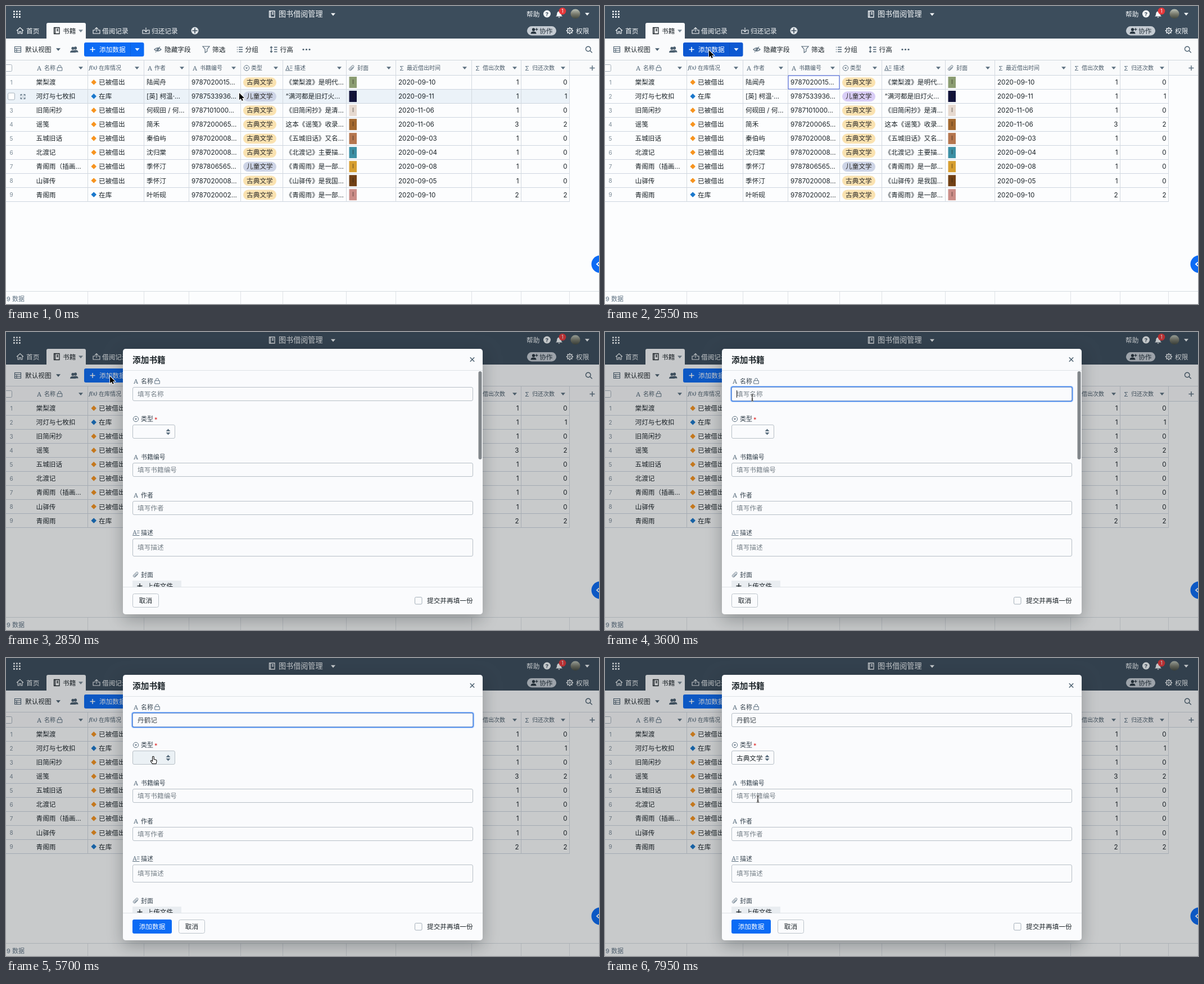
An HTML page with a canvas that plays this animation: 1055 px wide and 531 px high, repeating every 8 s.

```html
<!DOCTYPE html>
<html lang="zh-CN">
<head>
<meta charset="utf-8">
<title>图书借阅管理</title>
<style>
html, body { margin: 0; width: 100%; height: 100%; overflow: hidden; background: #fcfdfe; }
canvas { display: block; width: 1055px; height: 531px; }
</style>
</head>
<body>
<canvas id="stage"></canvas>
<script>
const W = 1055, H = 531, LOOP = 8000, STEP = 150;
const canvas = document.getElementById('stage');
const dpr = window.devicePixelRatio || 1;
canvas.width = W * dpr;
canvas.height = H * dpr;
const c = canvas.getContext('2d');

const SANS = 'Inter, "Noto Sans CJK SC", "Noto Sans CJK JP", sans-serif';
const SERIF = '"Noto Serif", "Liberation Serif", serif';
const INK = '#1c2429', GREY = '#5c7080', PALE = '#f5f8fa', BLUE = '#0b6bf5';
const BODY = 11.67, SMALL = 10;
const ROW0 = 123, ROWH = 25.03;
const lineY = i => Math.round(ROW0 + ROWH * i);
const midY = i => 136 + ROWH * i;

const COLS = [145, 245, 325, 417, 492, 605, 693, 828, 916, 1002];
const HEADS = [
  ['A', 59, '名称', 68, 133], ['f', 155, '在库情况', 165, 233], ['A', 256, '作者', 264, 313],
  ['A', 336, '书籍编号', 345, 405], ['o', 428, '类型', 436, 480], ['L', 503, '描述', 513, 593],
  ['clip', 615, '封面', 625, 681], ['S', 704, '最近借出时间', 713, 816],
  ['S', 839, '借出次数', 848, 905], ['S', 927, '归还次数', 936, 991]
];
// title, available, author, number, children's, description, cover, date, lent, returned
const BOOKS = [
  ['棠梨渡', 0, '陆闻舟', '9787020015…', 0, '《棠梨渡》是明代…', '#8b9d72', '2020-09-10', 1, 0],
  ['河灯与七枚扣', 1, '[英] 柯温·…', '9787533936…', 1, '“满河都是旧灯火…', '#11133a', '2020-09-11', 1, 1],
  ['旧简闲抄', 0, '何砚田 / 何…', '9787101000…', 0, '《旧简闲抄》是清…', '#e6d9cf', '2020-11-06', 1, 0],
  ['谣笺', 0, '简禾', '9787200065…', 0, '这本《谣笺》收录…', '#a2682f', '2020-11-06', 3, 2],
  ['五城旧话', 0, '秦伯屿', '9787020008…', 0, '《五城旧话》又名…', '#b5764f', '2020-09-03', 1, 0],
  ['北渡记', 0, '沈归棠', '9787020008…', 0, '《北渡记》主要描…', '#3b8fa4', '2020-09-04', 1, 0],
  ['青阁雨（插画…', 0, '季怀汀', '9787806565…', 1, '《青阁雨》是一部…', '#d79f30', '2020-09-08', 1, 0],
  ['山驿传', 0, '季怀汀', '9787020008…', 0, '《山驿传》是我国…', '#714014', '2020-09-05', 1, 0],
  ['青阁雨', 1, '叶听砚', '9787020002…', 0, '《青阁雨》是一部…', '#cb8d88', '2020-09-10', 2, 2]
];
const TYPED = [
  ['d', '的 到 都 大 对'], ['da', '大 打 达 答 搭'], ['dan', '但 单 蛋 担 淡'],
  ["dan'h", '丹鹤 单行 弹回 但还 但很'], ["dan'he", '丹鹤 单核 弹盒 但和 蛋盒'],
  ["dan'he'j", '丹鹤记 单核机 弹核集 丹鹤 单核']
];
// pointer moves: start, end, x, y
const MOVES = [
  [0, 150, 415, 156], [450, 1500, 404, 243], [1500, 1950, 366, 132], [1950, 2250, 185, 79],
  [2850, 3450, 262, 117], [5100, 5700, 262, 176], [6150, 6900, 264, 196], [7200, 7950, 272, 251]
];

const ICON = {
  caret: 'M-4-2.2H4L0 2.4Z',
  book: 'M-4.5-5.5H5V5.5H-4.5ZM-2.5-5.5V5.5M0-2.5H3M0 0H3',
  home: 'M-6 0L0-5.5L6 0M-4-1V5H-1.3V1.5H1.3V5H4V-1',
  out: 'M-2-1H-6V5H6V-1H2M0 2V-5.5M-3-2.7L0-5.5L3-2.7',
  back: 'M-2-1H-6V5H6V-1H2M0-5.5V2M-3-.8L0 2L3-.8',
  plus: 'M-4.5 0H4.5M0-4.5V4.5',
  cross: 'M-3.7-3.7L3.7 3.7M3.7-3.7L-3.7 3.7',
  clip: 'M3.8-1L-.8 3.6C-3 5.6-6 2.8-4 .6L.8-4.2C2.6-5.8 5-3.4 3.4-1.7L-1 2.6C-2 3.4-3 2.3-2.2 1.4L1.7-2.4',
  lock: 'M-4.3-.8H4.3V4.6H-4.3ZM-2.4-.8V-2.6A2.4 2.4 0 0 1 2.4-2.6V-.8',
  table: 'M-5.5-5H5.5V5H-5.5ZM-5.5-1.7H5.5M-5.5 1.7H5.5M-2-1.7V5',
  eye: 'M-6 0Q0-6 6 0Q0 6-6 0ZM-1.7 0A1.7 1.7 0 1 0 1.7 0A1.7 1.7 0 1 0-1.7 0M-4 5L4-5',
  funnel: 'M-6-5.5H6L1.8-.5V3.5L-1.8 5.5V-.5Z',
  list: 'M-2-4H5M-2 0H5M-2 4H5M-5-4H-4M-5 0H-4M-5 4H-4',
  height: 'M-4-5V5M-6-3L-4-5L-2-3M-6 3L-4 5L-2 3M1-4H6.5M1 0H6.5M1 4H6.5',
  search: 'M-5.5-1A4.3 4.3 0 1 0 3.1-1A4.3 4.3 0 1 0-5.5-1M2.2 2.2L5.8 5.8',
  bell: 'M-6 3.5Q-3.7 2-3.7-1.5Q-3.5-5 0-5.5Q3.5-5 3.7-1.5Q3.7 2 6 3.5ZM-1.8 4.5H1.8L0 6.2Z',
  person: 'M-2.6-2.5A2.6 2.8 0 1 1 2.6-2.5A2.6 2.8 0 1 1-2.6-2.5M-5 5Q-5 1.5-1.5 1H1.5Q5 1.5 5 5Z',
  expand: 'M-4-1V-4H-1M1-4H4V-1M4 1V4H1M-1 4H-4V1M-4-4L-1-1M4-4L1-1M4 4L1 1M-4 4L-1 1',
  lines: 'M2-3.5H6.5M2 0H6.5M-6 4.5H6.5',
  updown: 'M-4-1L0-5.5L4-1ZM-4 1L0 5.5L4 1Z',
  chev: 'M-1.5-1L0 .8L1.5-1',
  arrow: 'M0 0V12.3L2.9 9.7L4.8 14L6.8 13.1L4.9 8.9H9Z',
  hand: 'M-1.4 0Q0-1.5 1.2 0V4.5L5 5.5Q6.2 6 6 8L5 12.5H-1.5L-4.6 8Q-5 6.4-3.4 6.6L-1.4 8Z',
  beam: 'M-2.3-5.5Q0-5.5 0-4Q0-5.5 2.3-5.5M0-4V4.5M-2.3 6Q0 6 0 4.5Q0 6 2.3 6M-1.3 2.5H1.3'
};
for (const k in ICON) ICON[k] = new Path2D(ICON[k]);

function icon(name, x, y, color, fill, lw = 1.1) {
  c.save();
  c.translate(x, y);
  c.lineWidth = lw;
  c.fillStyle = c.strokeStyle = color;
  fill ? c.fill(ICON[name]) : c.stroke(ICON[name]);
  c.restore();
}

function text(s, x, y, size = BODY, color = INK, align = 'left', weight = 400, family = SANS) {
  c.font = `${weight} ${size}px ${family}`;
  c.textAlign = align;
  c.fillStyle = color;
  c.fillText(s, x, y + size * .37);
}

function rect(x, y, w, h, color) {
  c.fillStyle = color;
  c.fillRect(x, y, w, h);
}

function box(x, y, w, h, r, fill, stroke, lw = 1) {
  c.beginPath();
  c.roundRect(x, y, w, h, r);
  if (fill) { c.fillStyle = fill; c.fill(); }
  if (stroke) { c.strokeStyle = stroke; c.lineWidth = lw; c.stroke(); }
}

function dot(x, y, r, color) {
  c.beginPath();
  c.arc(x, y, r, 0, 7);
  c.fillStyle = color;
  c.fill();
}

function ring(x, y, r, color, lw = 1) {
  c.beginPath();
  c.arc(x, y, r, 0, 7);
  c.strokeStyle = color;
  c.lineWidth = lw;
  c.stroke();
}

function fieldIcon(kind, x, y) {
  if (kind === 'A') text('A', x, y, 11.5, GREY, 'center', 500, SERIF);
  else if (kind === 'f') text('f(x)', x, y, 8, GREY, 'center', 'italic 600', SERIF);
  else if (kind === 'S') text('Σ', x, y, 11, GREY, 'center');
  else if (kind === 'clip') icon('clip', x, y, GREY, false, 1);
  else if (kind === 'o') { ring(x, y, 4.7, GREY); icon('chev', x, y, GREY, false, 1.3); }
  else {
    text('A', x - 2, y - .5, 10.5, GREY, 'center', 500, SERIF);
    icon('lines', x, y, GREY, false, 1);
  }
}

function drawHeader() {
  rect(0, 0, W, 58, '#3c4d5c');
  for (let i = 0; i < 9; i++) box(13 + i % 3 * 5, 8.5 + (i / 3 | 0) * 4.8, 2.8, 2.8, .6, PALE);
  icon('book', 473, 14.5, PALE, false, 1.3);
  text('图书借阅管理', 485, 14.5, 13.1, PALE, 'left', 500);
  icon('caret', 582, 15, PALE, true);
  text('帮助', 926, 14.5, BODY, PALE);
  dot(962.5, 14, 6.5, PALE);
  text('?', 962.5, 14.3, 9.5, '#3c4d5c', 'center', 700);
  icon('bell', 984, 15, PALE, true);
  dot(990, 9, 6.3, '#e5383b');
  text('1', 990, 9.3, 8.5, '#fff', 'center');
  const g = c.createLinearGradient(0, 6, 0, 23);
  g.addColorStop(0, '#b9bfb4');
  g.addColorStop(.5, '#77796c');
  g.addColorStop(1, '#40463c');
  dot(1013, 14, 8.5, g);
  icon('caret', 1034, 14.5, PALE, true);

  icon('home', 25, 44, PALE);
  text('首页', 36, 44.5, BODY, PALE);
  box(72, 30, 70, 29, [3, 3, 0, 0], '#fafbfc');
  icon('book', 90, 44, INK, false, 1.3);
  text('书籍', 101, 44.5, BODY, INK);
  icon('caret', 133, 44.5, '#7b8a96', true);
  icon('out', 161, 44, PALE);
  text('借阅记录', 171, 44.5, BODY, PALE);
  icon('back', 249, 44, PALE);
  text('归还记录', 259, 44.5, BODY, PALE);
  dot(336, 44, 6.5, '#dfe4e8');
  icon('plus', 336, 44, '#3c4d5c', false, 1.6);
  box(927, 36, 52, 16.5, 8.2, '#c5ccd3');
  icon('person', 938.5, 44.5, '#26333e', true);
  rect(941.5, 41, 5, 1.2, '#26333e');
  rect(943.4, 39.1, 1.2, 5, '#26333e');
  text('协作', 949, 44.5, BODY, '#26333e');
  ring(1003, 44, 4.2, PALE, 1.4);
  ring(1003, 44, 1.5, PALE);
  for (let i = 0; i < 8; i++) {
    const a = i * Math.PI / 4;
    dot(1003 + 5.3 * Math.cos(a), 44 + 5.3 * Math.sin(a), 1, PALE);
  }
  text('权限', 1014, 44.5, BODY, PALE);
}

function drawToolbar(t) {
  rect(0, 58, W, 39, '#fafbfc');
  const y = 77.5, ic = '#4c6070';
  const hover = t >= 2250 && t < 2700;
  icon('table', 21, y, ic);
  text('默认视图', 34, y);
  icon('caret', 93, y, ic, true);
  icon('person', 123.5, y, ic, true);
  icon('person', 119, y + .5, ic, true);
  box(139, 65, 106.5, 25, 3, hover ? '#0c58d2' : BLUE);
  rect(221, 66, 1, 23, 'rgba(0,0,0,.1)');
  icon('plus', 154, y, '#fff', false, 1.5);
  text('添加数据', 166, y, BODY, '#fff', 'left', 500);
  icon('caret', 233.5, y, '#fff', true);
  icon('eye', 270, y, ic);
  text('隐藏字段', 282, y);
  icon('funnel', 356, y, ic);
  text('筛选', 367, y);
  icon('list', 416, y, ic, false, 1.3);
  text('分组', 425.5, y);
  icon('height', 476, y, ic, false, 1.3);
  text('行高', 487.5, y);
  [529, 534.5, 540].forEach(x => dot(x, y, 1.6, ic));
  icon('search', 1037, y, ic, false, 1.4);
}

function drawRow(b, i, hover) {
  const y = midY(i), top = lineY(i);
  if (hover) rect(0, top + 1, 1003, lineY(i + 1) - top, '#ebf2f8');
  rect(0, lineY(i + 1), 1003, 1, '#cdd5df');
  if (hover) {
    box(3.5, y - 6, 12, 12, 2, '#fff', '#a5b0ba');
    icon('expand', 30, y + .5, GREY, false, 1);
  } else text(i + 1, 9.5, y, SMALL, '#7b8a96', 'center');
  text(b[0], 53.5, y);
  const half = 4.7;
  c.save();
  c.translate(156.2, y - .2);
  c.rotate(Math.PI / 4);
  box(-half * .72, -half * .72, half * 1.44, half * 1.44, .6, b[1] ? '#1b78cc' : '#f79420');
  c.restore();
  text(b[1] ? '在库' : '已被借出', 165, y);
  text(b[2], 250, y);
  text(b[3], 330, y);
  const kids = i === 1 && !hover ? '#d9cdf6' : '#cdd4e6';
  box(422, y - 8.7, 59, 17.8, 8.9, b[4] ? kids : '#fae2b0');
  text(b[4] ? '儿童文学' : '古典文学', 451.4, y, BODY, '#2b2a28', 'center');
  text(b[5], 497.5, y);
  rect(610.5, y - 10, 13.5, 20, b[6]);
  rect(616.5, y - 5, 2, 8, 'rgba(30,25,20,.35)');
  text(b[7], 698, y);
  text(b[8], 912.5, y, BODY, INK, 'right');
  text(b[9], 998.5, y, BODY, INK, 'right');
}

function drawTable(t, p) {
  rect(0, 97, W, H - 97, '#fcfdfe');
  rect(0, 97, W, 26, '#f9fafb');
  rect(0, 96, W, 1, '#cfd6dc');
  rect(0, ROW0, W, 1, '#cdd5df');
  box(-1.5, 104.5, 12, 12, 2, '#fff', '#a5b0ba');
  for (const [kind, ix, label, tx, cx] of HEADS) {
    fieldIcon(kind, ix, 110.5);
    text(label, tx, 110.5, SMALL, '#4c5d6b');
    icon('caret', cx, 110.5, GREY, true, 1);
  }
  icon('lock', 95.5, 110.5, GREY, false, 1);
  icon('plus', 1043, 110.5, GREY, false, 1.5);
  const over = t < 2550 && p.y > ROW0 ? Math.floor((p.y - ROW0) / ROWH) : -1;
  BOOKS.forEach((b, i) => drawRow(b, i, i === over));
  for (const x of COLS) {
    rect(x, 97, 1, 252, '#d3d9e0');
    rect(x, 508, 1, 23, '#dfe3e7');
  }
  if (t >= 1950 && t < 2700) box(326, 124, 91, 24, 0, null, '#3d56d8');
  rect(0, 508, W, 1, '#d6dce1');
  text('9 数据', 1, 522, 11, GREY);
  dot(1057, 460, 15.5, BLUE);
  c.beginPath();
  c.moveTo(1055, 456.5);
  c.lineTo(1051, 460);
  c.lineTo(1055, 463.5);
  c.strokeStyle = '#fff';
  c.lineWidth = 1.8;
  c.stroke();
}

function label(kind, s, y) {
  fieldIcon(kind, 231, y);
  text(s, 240, y, 10.9, '#33414c');
}

function field(y, h, hint) {
  box(225.5, y + .5, 605, h - 1, 2.5, null, '#b7bfc6');
  if (hint) text(hint, 234, y + h / 2, BODY, '#757f87');
}

function drawName(t) {
  const focus = t >= 3600 && t < 5850, n = (t - 3900) / STEP;
  field(98, 25, t < 3900 ? '填写名称' : '');
  if (focus) {
    box(223.8, 96.8, 608.4, 27.4, 3.5, null, 'rgba(45,125,240,.3)', 2.3);
    box(224.7, 97.7, 606.6, 25.6, 3, null, '#2f78ee', 1.2);
  }
  if (t >= 4950) text('丹鹤记', 234, 110.5, BODY, '#3c444a');
  else if (n >= 0) {
    const s = TYPED[Math.min(n, 5)][0];
    text(s, 234, 110.5, BODY, '#3c444a');
    const w = c.measureText(s).width;
    rect(234, 116, w, 1, '#3c444a');
    rect(234 + w, 104, 1, 13, '#222');
  }
  if (t >= 3600 && t < 3900) rect(234, 104, 1, 13, '#222');
  if (t >= 4950 && t < 5250) rect(270, 104, 1, 13, '#222');
}

function button(x, w, s, primary) {
  if (primary) box(x, 466, w, 25, 3, BLUE);
  else box(x + .5, 466.5, w - 1, 24, 3, null, '#bcc4cb');
  text(s, x + w / 2, 478.5, BODY, primary ? '#fff' : INK, 'center');
}

function drawDialog(t) {
  const p = Math.min(1, (t - 2558) / 292), s = .5 + p / 2;
  if (p <= 0) return;
  rect(0, 0, W, H, `rgba(16,22,26,${.22 * p ** .2})`);
  c.save();
  c.translate(528, 266.5);
  c.scale(s, s);
  c.translate(-528, -266.5);
  c.globalAlpha = p ** .7;

  // shadow only outside the panel, so it never shows through it
  c.save();
  c.beginPath();
  c.rect(-400, -300, 1900, 1200);
  c.roundRect(208, 30, 640, 473, 5);
  c.clip('evenodd');
  c.shadowColor = 'rgba(16,22,26,.3)';
  c.shadowBlur = 30 * dpr;
  c.shadowOffsetY = 10 * dpr;
  box(208, 30, 640, 473, 5, '#fff');
  c.restore();

  box(208, 30, 640, 473, 5, '#fafbfd');
  rect(208, 68, 640, 1, '#dde2e6');
  text('添加书籍', 225, 49.5, 14.7, INK, 'left', 600);
  icon('cross', 829.5, 49, '#4c6070', false, 1.5);

  label('A', '名称', 87.5);
  icon('lock', 269, 87.5, GREY, false, 1);
  drawName(t);
  label('o', '类型', 155);
  text('*', 264, 155.5, 11, '#e02020');
  box(225.5, 165.5, 75, 24, 2.5, t >= 5700 && t < 5850 ? '#ebf1f5' : null, '#b7bfc6');
  icon('updown', 288.5, 178, GREY, true);
  if (t >= 7350) text('古典文学', 234, 178.5);
  label('A', '书籍编号', 223);
  field(233, 25, '填写书籍编号');
  label('A', '作者', 290.5);
  field(301, 25, '填写作者');
  label('L', '描述', 358);
  field(368, 32, '填写描述');
  label('clip', '封面', 432.5);

  c.save();
  c.beginPath();
  c.rect(208, 430, 640, 24);
  c.clip();
  rect(225, 443, 87, 25, '#e9edf1');
  icon('plus', 238, 452.5, INK, false, 1.4);
  text('上传文件', 250.5, 452.5);
  c.restore();

  if (t >= 2850 && t < 4050) box(840.5, 70, 6, 157, 3, '#82878b');
  rect(208, 454, 640, 1, '#dde2e6');
  if (t >= 3900) {
    button(225, 70, '添加数据', true);
    button(307, 47, '取消');
  } else button(225, 47, '取消');
  box(727.5, 472.5, 12.5, 12.5, 2, null, '#a5b0ba');
  text('提交并再填一份', 749, 478.5);
  c.restore();
}

function drawIme(t) {
  if (t < 3900 || t >= 4950) return;
  const [keys, list] = TYPED[Math.min(5, (t - 3900) / STEP)];
  const size = 13.3, cyan = '#86d3ee';
  const words = list.split(' ').map((w, i) => `${i + 1}.${w}`);
  c.font = `400 ${size}px ${SANS}`;
  const widths = words.map(w => c.measureText(w).width);
  const end = widths.reduce((a, b) => a + b + 8.5, 247) - 8.5;
  box(236, 120, end + 33 - 236, 59, 3, 'rgba(48,48,48,.86)');
  text(keys, 246.5, 135.5, size, cyan);
  rect(247 + c.measureText(keys).width, 126, 1, 19, cyan);
  let x = 247;
  words.forEach((w, i) => {
    text(w, x, 162.5, size, i ? '#fff' : '#74bcd8');
    x += widths[i] + 8.5;
  });
  c.strokeStyle = cyan;
  c.lineWidth = 2;
  for (const d of [-1, 1]) {
    const ax = end + 18 + d * 5;
    c.beginPath();
    c.moveTo(ax - d * 2, 160.5);
    c.lineTo(ax + d * 2, 164);
    c.lineTo(ax - d * 2, 167.5);
    c.stroke();
  }
}

function drawMenu(t, p) {
  if (t < 5850 || t >= 7200) return;
  c.save();
  if (t >= 7050) c.globalAlpha = .5;
  c.save();
  c.shadowColor = 'rgba(0,0,0,.3)';
  c.shadowBlur = 5 * dpr;
  box(216, 167.5, 85, 86, 4, '#f1f1f2');
  c.restore();
  const over = p.y < 187 ? 0 : 1;
  ['', '古典文学', '儿童文学', '现代文学'].forEach((s, i) => {
    const y = 179 + i * 20;
    if (i === over) rect(216, y - 9, 85, 18, '#3478f0');
    text(s, 234, y, BODY, i === over ? '#fff' : INK);
  });
  c.restore();
}

function pointer(t) {
  const p = { x: 415, y: 155 };
  for (const [a, b, x, y] of MOVES) {
    if (t <= a) break;
    const u = Math.min(1, (t - a) / (b - a)), e = u * u * (3 - 2 * u);
    p.x += (x - p.x) * e;
    p.y += (y - p.y) * e;
  }
  return p;
}

function drawPointer(t, p) {
  const inName = t >= 3150 && t < 5400 && p.y > 98 && p.y < 123;
  const inNumber = t > 7200 && p.y > 233;
  if (inName || inNumber) {
    icon('beam', p.x, p.y, 'rgba(255,255,255,.8)', false, 2.6);
    icon('beam', p.x, p.y, '#111', false, 1.1);
  } else if (t >= 5550 && t < 5850) {
    icon('hand', p.x, p.y, '#fff', true);
    icon('hand', p.x, p.y, '#111', false, 1.1);
  } else {
    icon('arrow', p.x, p.y, '#fff', false, 1.8);
    icon('arrow', p.x, p.y, '#000', true);
  }
}

function frame() {
  const t = Math.floor(performance.now() % LOOP / STEP) * STEP;
  const p = pointer(t);
  c.setTransform(dpr, 0, 0, dpr, 0, 0);
  drawHeader();
  drawToolbar(t);
  drawTable(t, p);
  drawDialog(t);
  drawIme(t);
  drawMenu(t, p);
  drawPointer(t, p);
  requestAnimationFrame(frame);
}
frame();
</script>
</body>
</html>
```
